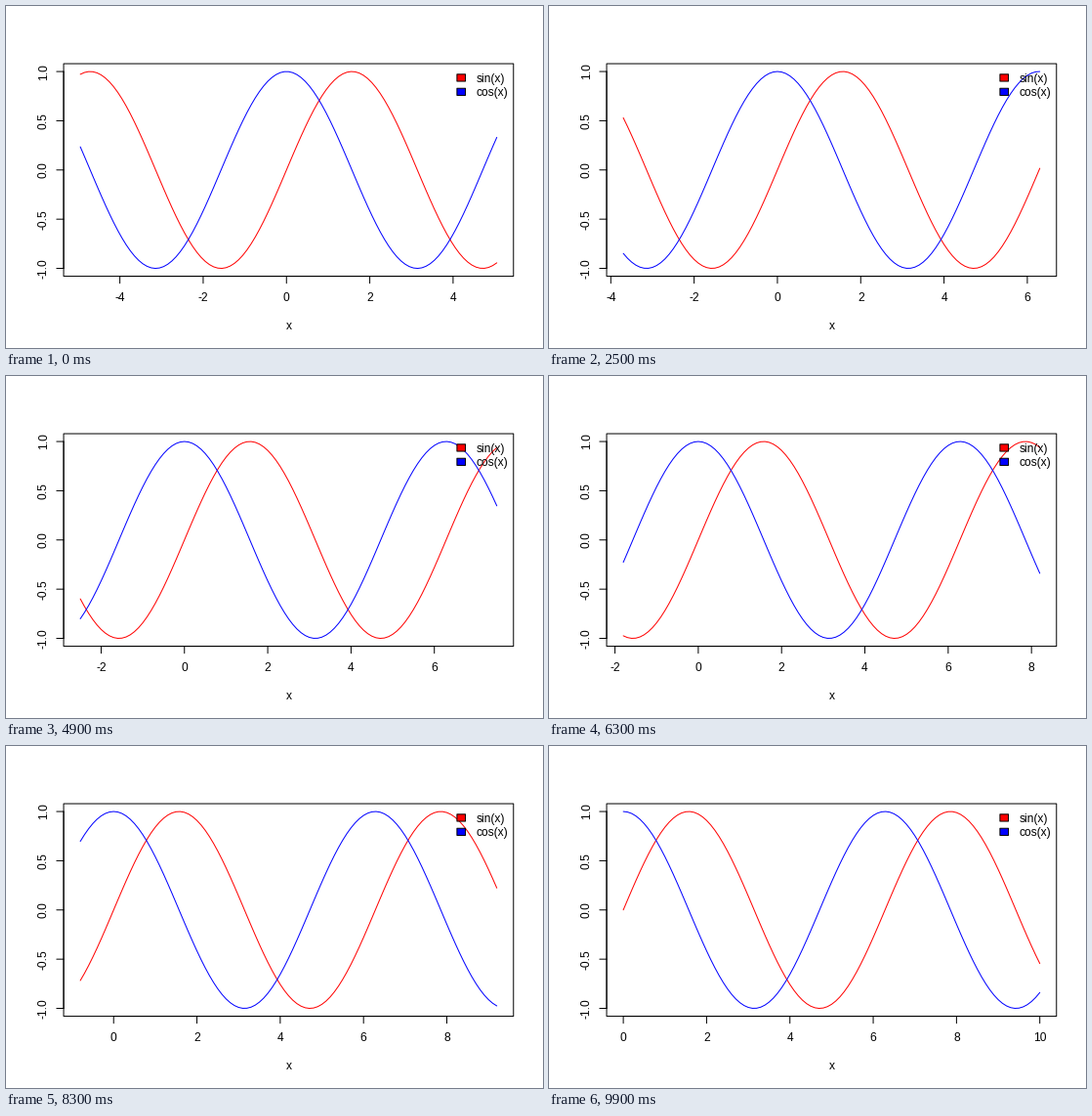
A matplotlib script for the animation above (10000 ms loop, 550x350 px).

```python
import numpy as np
import matplotlib.pyplot as plt
from matplotlib.animation import FuncAnimation
from matplotlib.patches import Rectangle

W, H, DPI = 550, 350, 100
PX = 72 / DPI                      # points per pixel
LINE = 14.4                        # height of one margin line
LEFT, RIGHT = 4.1 * LINE, W - 2.1 * LINE
TOP, BOTTOM = 4.1 * LINE, H - 5.1 * LINE
TICK = LINE / 2
FRAMES, SPAN, STEP = 100, 10, 0.05

plt.rcParams["font.family"] = "Liberation Sans"
plt.rcParams["path.simplify"] = False

fig = plt.figure(figsize=(W / DPI, H / DPI), dpi=DPI, facecolor="white")
ax = fig.add_axes([0, 0, 1, 1])


def line(xs, ys, color="black"):
    ax.plot(xs, ys, color=color, lw=PX, snap=False,
            solid_capstyle="round", solid_joinstyle="round")


def rect(x, y, w, h, fill="none"):
    ax.add_patch(Rectangle((x, y), w, h, fc=fill, ec="black", lw=PX,
                           snap=False, joinstyle="round", zorder=2))


def label(x, y, s, ha="center", rotation=0):
    ax.text(x, y, s, size=12 * PX, ha=ha, va="baseline",
            rotation=rotation, rotation_mode="anchor")


def scale(lo, hi, start, end):
    """Map data to pixels with a 4% margin at both ends."""
    pad = 0.04 * (hi - lo)
    lo, hi = lo - pad, hi + pad
    return lambda v: start + (v - lo) / (hi - lo) * (end - start)


def x_axis(sx, a):
    lo, hi = a - 0.04 * SPAN, a + 1.04 * SPAN
    first = int(np.ceil(lo / 2 - 1e-9)) * 2
    last = int(np.floor(hi / 2 + 1e-9)) * 2
    line([sx(first), sx(last)], [BOTTOM, BOTTOM])
    for v in range(first, last + 1, 2):
        line([sx(v)] * 2, [BOTTOM, BOTTOM + TICK])
        label(sx(v), BOTTOM + 1.8 * LINE, str(v))
    label((LEFT + RIGHT) / 2, BOTTOM + 3.8 * LINE, "x")


def y_axis(sy):
    line([LEFT, LEFT], [sy(-1), sy(1)])
    for v in (-1, -0.5, 0, 0.5, 1):
        line([LEFT, LEFT - TICK], [sy(v)] * 2)
        label(LEFT - 1.2 * LINE, sy(v), f"{v:.1f}", rotation=90)


def legend():
    x, w, h = 461.9, 8.64, 7.2
    for i, (name, color) in enumerate((("sin(x)", "red"), ("cos(x)", "blue"))):
        y = TOP + (i + 1) * LINE
        rect(x, y - h / 2, w, h, color)
        label(x + w + 10.8, y + 4.3, name, ha="left")


def draw(i):
    ax.clear()
    ax.set(xlim=(0, W), ylim=(H, 0))
    ax.axis("off")

    a = STEP * (i - FRAMES + 1)
    x = a + np.linspace(0, SPAN, 101)
    s, c = np.sin(x), np.cos(x)
    sx = scale(a, a + SPAN, LEFT, RIGHT)
    sy = scale(s.min(), s.max(), BOTTOM, TOP)

    line(sx(x), sy(s), "red")
    x_axis(sx, a)
    y_axis(sy)
    rect(LEFT, TOP, RIGHT - LEFT, BOTTOM - TOP)
    line(sx(x), sy(c), "blue")
    # keep the legend above both curves
    for art in ax.lines:
        art.set_zorder(1)
    legend()


anim = FuncAnimation(fig, draw, frames=FRAMES, init_func=lambda: None,
                     interval=100, repeat=True, repeat_delay=0)
plt.show()
```
